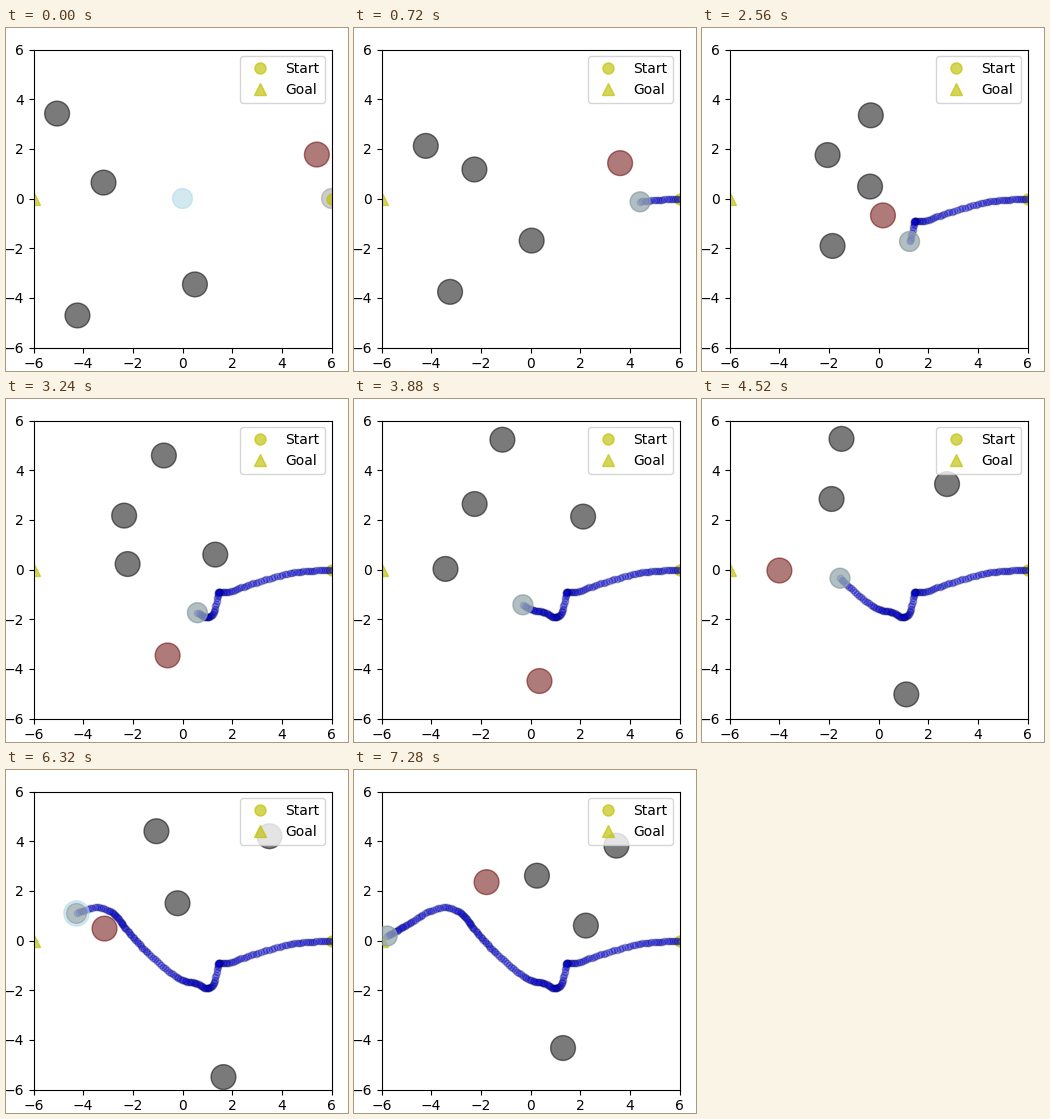
A matplotlib script for the animation above (7720 ms loop, 342 by 343 pixels).

```python
import numpy as np
import matplotlib.pyplot as plt
from matplotlib.animation import FuncAnimation
from matplotlib.patches import Circle

W, H, DPI = 342, 343, 100
STEP = 40
FRAMES = 193
LAST = 182

# Robot waypoints: step, then position
ROBOT_T = [0, 20, 35, 45, 51, 55, 64, 72, 81, 94, 113, 121, 127, 134,
           142, 149, 156, 165, 182]
ROBOT_X = [6, 4.22, 2.65, 1.8, 1.48, 1.44, 1.25, .97, .6, -.1, -1.55, -2,
           -2.31, -2.55, -2.9, -3.45, -4.1, -4.8, -5.77]
ROBOT_Y = [0, -.17, -.62, -.91, -.9, -.95, -1.73, -1.93, -1.74, -1.55, -.35,
           .15, .5, .85, 1.17, 1.35, 1.17, .75, .18]

# Obstacles share one set of key steps
KEY_T = [0, 35, 64, 81, 100, 113, 134, 158, 182]
OBSTACLE_X = [
    [-5.05, -3.4, -1.85, -.6, .52, 1.12, 1.53, 1.65, 1.31],
    [-3.18, -1.66, -2.05, -2.35, -2.2, -1.89, -1.65, -.2, 2.23],
    [-4.23, -2.19, .18, 1.32, 2.25, 2.76, 3.27, 3.5, 3.46],
    [.5, -.28, -.31, -.75, -1.2, -1.49, -1.55, -1.05, .26],
    [5.41, 1.99, -.34, -2.21, -3.58, -3.99, -3.54, -3.14, -1.77]]
OBSTACLE_Y = [
    [3.42, .8, -1.91, -3.46, -4.63, -5.03, -5.19, -5.5, -4.33],
    [.64, 1.57, 1.75, 2.17, 2.7, 2.84, 2.42, 1.5, .6],
    [-4.71, -2.78, -.68, .6, 2.4, 3.44, 3.69, 4.2, 3.82],
    [-3.46, .04, 3.35, 4.59, 5.28, 5.26, 5.57, 4.4, 2.61],
    [1.77, 1.09, .48, .22, 0, -.04, .2, .48, 2.35]]


def smooth(t, x, y):
    """Cubic Hermite path through the waypoints, one row per step."""
    t, p = np.array(t, float), np.column_stack([x, y])
    m = np.gradient(p, t, axis=0)
    s = np.arange(LAST + 1)
    k = np.clip(np.searchsorted(t, s, side="right") - 1, 0, len(t) - 2)
    h = (t[k + 1] - t[k])[:, None]
    u = (s - t[k])[:, None] / h
    return ((1 + 2 * u) * (1 - u) ** 2 * p[k] + u * (1 - u) ** 2 * h * m[k]
            + u * u * (3 - 2 * u) * p[k + 1] + u * u * (u - 1) * h * m[k + 1])


robot_path = smooth(ROBOT_T, ROBOT_X, ROBOT_Y)
obstacle_paths = np.array([smooth(KEY_T, x, y)
                           for x, y in zip(OBSTACLE_X, OBSTACLE_Y)])

fig = plt.figure(figsize=(W / DPI, H / DPI), dpi=DPI)
ax = fig.add_axes([27.5 / W, 23.5 / H, 298 / W, 298 / H])
ax.set(xlim=(-6, 6), ylim=(-6, 6))
ax.set_xticks(range(-6, 7, 2))
ax.set_yticks(range(-6, 7, 2))

ax.plot(6, 0, "yo", ms=8, alpha=.65, ls="", label="Start")
ax.plot(-6, 0, "y^", ms=8, alpha=.65, ls="", label="Goal")
ax.legend(loc="upper right")

trail, = ax.plot([], [], "o", ms=4.6, mfc=(0, 0, 1, .3), mec=(0, 0, .35, .3),
                 mew=1, zorder=2.5)
obstacles = [ax.add_patch(Circle((0, 0), .5, alpha=.52)) for _ in OBSTACLE_X]
zone = ax.add_patch(Circle((0, 0), .4, color="lightblue", alpha=.55))
robot = ax.add_patch(Circle((6, 0), .4, color="gray", alpha=.4))


def update(i):
    n = min(i, LAST)
    pos = robot_path[n]
    gaps = np.hypot(*(obstacle_paths[:, n] - pos).T)
    nearest = gaps.argmin()
    for j, body in enumerate(obstacles):
        body.center = obstacle_paths[j, n]
        body.set_color((.4, 0, 0) if j == nearest else "black")

    robot.center = pos
    zone.center = pos if n else (0, 0)
    zone.radius = .4 + np.clip(.65 * (1.45 - gaps[nearest]), 0, .16)
    for body in (zone, robot):
        body.set_zorder(3 if n else 1)

    done = robot_path[:n + 1] if n else robot_path[:0]
    trail.set_data(done[:, 0], done[:, 1])
    return [*obstacles, zone, robot, trail]


anim = FuncAnimation(fig, update, frames=FRAMES, interval=STEP, repeat=True,
                     repeat_delay=0, init_func=lambda: update(0))
plt.show()
```
